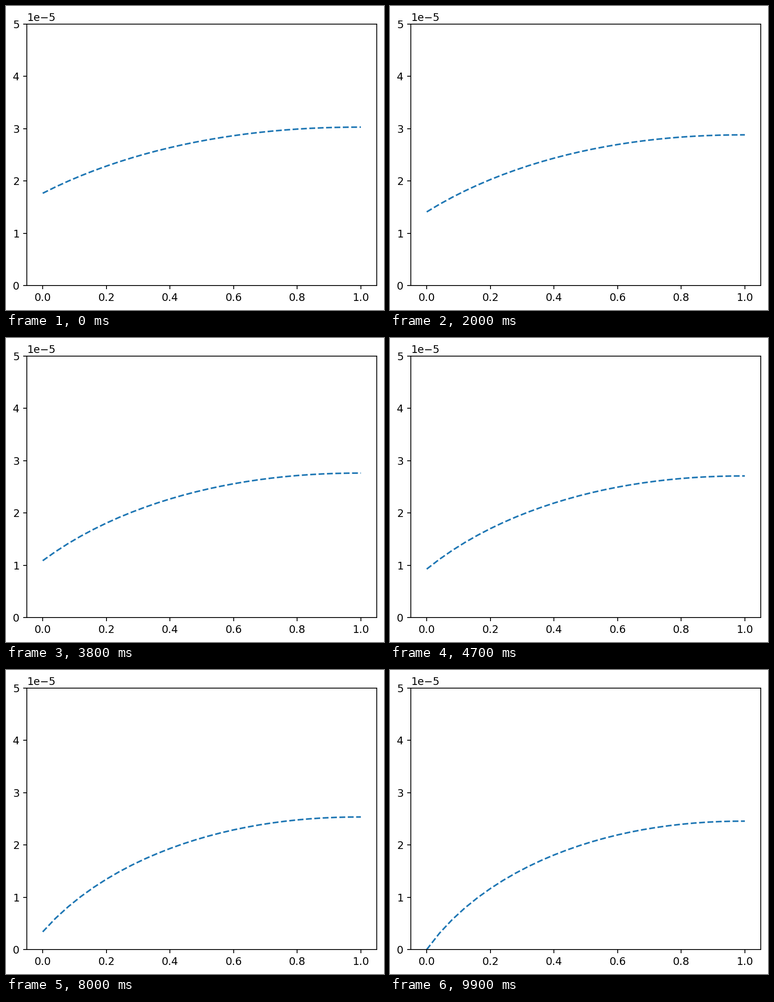
A matplotlib script for the animation above (10 s loop, 835 by 671 pixels).

```python
import numpy as np
import matplotlib.pyplot as plt
from matplotlib.animation import FuncAnimation

W, H, DPI = 835, 671, 128
K = 1.309  # scale of all point sizes
FRAMES = 100
LEFT, RIGHT, TOP, BOTTOM = 46, 819, 40, 617
SHIFT = 1.81  # offset in the quadratic profile law

plt.rcParams.update({
    "font.family": "DejaVu Sans",
    "font.size": 10 * K,
    "axes.linewidth": 0.8 * K,
    "lines.linewidth": 1.5 * K,
})
for axis in ("xtick", "ytick"):
    plt.rcParams.update({
        f"{axis}.major.size": 3.5 * K,
        f"{axis}.major.width": 0.8 * K,
        f"{axis}.major.pad": 3.5 * K,
    })

fig = plt.figure(figsize=(W / DPI, H / DPI), dpi=DPI, facecolor="white")
ax = fig.add_axes([LEFT / W, 1 - BOTTOM / H,
                   (RIGHT - LEFT) / W, (BOTTOM - TOP) / H])
ax.set_xlim(-0.05, 1.05)
ax.set_ylim(0, 5e-5)
ax.yaxis.OFFSETTEXTPAD = 3 * K

x = np.linspace(0, 1, 26)
rise = 1 - (1 - x) ** 2.1
line, = ax.plot([], [], "--", color="tab:blue")


def profile(u):
    """Curve at loop progress u: the left end sinks to zero, the right end slows."""
    start = SHIFT + 1.765 * (1 - u)
    end = SHIFT + 3.03 - 0.771 * u + 0.197 * u**2
    return (np.sqrt(start**2 + (end**2 - start**2) * rise) - SHIFT) * 1e-5


def update(i):
    line.set_data(x, profile(i / (FRAMES - 1)))
    return line,


anim = FuncAnimation(fig, update, frames=FRAMES, interval=100,
                     repeat=True, repeat_delay=0)
plt.show()
```
